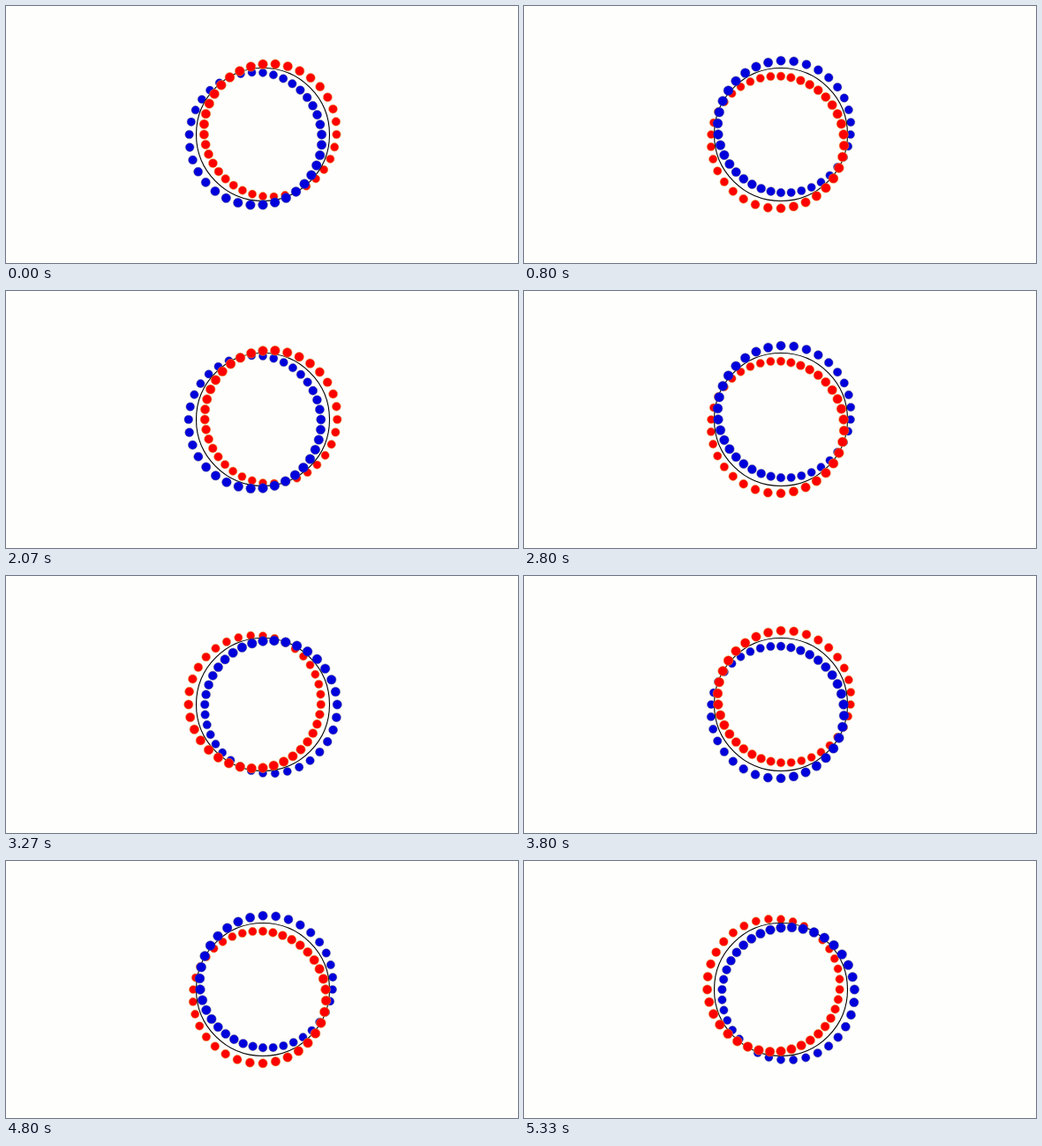
An HTML page with a canvas for the animation above (5390 ms loop, 580 px wide and 292 px high).

```html
<!DOCTYPE html>
<html lang="en">
<head>
<meta charset="utf-8">
<title>Twin spirals around a ring</title>
<style>
  html, body { margin: 0; width: 100%; height: 100%; overflow: hidden; background: #fefefc; }
  canvas { display: block; }
</style>
</head>
<body>
<canvas id="stage" width="580" height="292"></canvas>
<script>
const ctx = document.getElementById('stage').getContext('2d');
const TAU = Math.PI * 2;
const rad = degrees => degrees * Math.PI / 180;

const LOOP = 5390;
const CENTER = { x: 291, y: 146 };
const RING = 75.5;
const ORBIT = 75;
const SWING = 9.7;
const DOTS = 36;
const START = 30;
const TURN_PER_STEP = 12;
const STRANDS = [
  { color: '#ff0000', rim: 'rgba(220,165,60,0.6)', shift: 0 },
  { color: '#0000dc', rim: 'rgba(90,90,130,0.5)', shift: 180 }
];

// 15 steps per second, snapped to a 10 ms clock.
const stepAt = ms => Math.floor((Math.floor(ms / 10) * 10 + 5) * 15 / 1000);

function dotsAt(step) {
  const dots = [];
  for (const strand of STRANDS) {
    const phase = START + strand.shift - TURN_PER_STEP * step;
    for (let i = 0; i < DOTS; i++) {
      const angle = i * 360 / DOTS;
      const twist = rad(angle - phase);
      const distance = ORBIT + SWING * Math.cos(twist);
      const depth = Math.sin(twist);
      dots.push({
        x: CENTER.x + distance * Math.cos(rad(angle)),
        y: CENTER.y - distance * Math.sin(rad(angle)),
        r: 5 + 0.45 * depth,
        depth, strand
      });
    }
  }
  return dots.sort((a, b) => a.depth - b.depth);
}

function drawDot({ x, y, r, strand }) {
  ctx.beginPath();
  ctx.arc(x, y, r, 0, TAU);
  ctx.fillStyle = strand.color;
  ctx.fill();
  ctx.strokeStyle = strand.rim;
  ctx.lineWidth = 0.9;
  ctx.stroke();
}

function drawRing() {
  ctx.beginPath();
  ctx.arc(CENTER.x, CENTER.y, RING, 0, TAU);
  ctx.strokeStyle = '#000';
  ctx.lineWidth = 1.1;
  ctx.stroke();
}

function draw(ms) {
  const dots = dotsAt(stepAt(ms));
  ctx.fillStyle = '#fefefc';
  ctx.fillRect(0, 0, 580, 292);
  dots.filter(dot => dot.depth < 0).forEach(drawDot);
  drawRing();
  dots.filter(dot => dot.depth >= 0).forEach(drawDot);
}

const began = performance.now();
function tick() {
  draw((performance.now() - began) % LOOP);
  requestAnimationFrame(tick);
}
tick();
</script>
</body>
</html>
```
